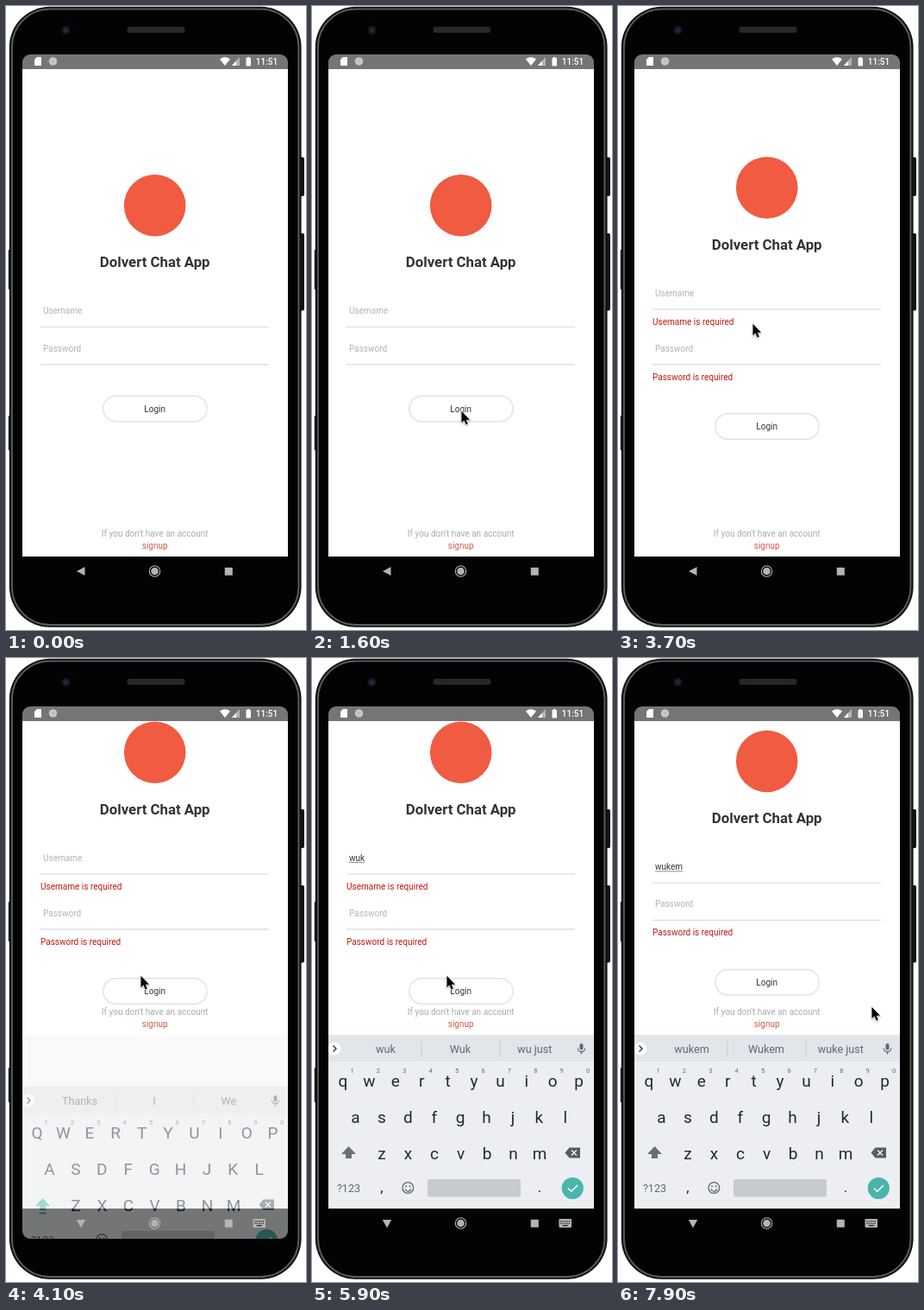
Recreate the animation shown at these times as an HTML page with a canvas. Size 348 by 722 pixels, loop 8 s.

```html
<!DOCTYPE html>
<html lang="en">
<head>
<meta charset="utf-8">
<title>Login form</title>
<style>
  html, body { margin: 0; width: 100%; height: 100%; overflow: hidden; background: #fff; }
  canvas { display: block; width: 348px; height: 722px; }
</style>
</head>
<body>
<canvas id="stage" width="348" height="722"></canvas>
<script>
const stage = document.getElementById('stage');
const screen = stage.getContext('2d');
const layer = Object.assign(document.createElement('canvas'), { width: 348, height: 722 });
const layerCtx = layer.getContext('2d');
let ctx = screen;

const LOOP = 8000, STEP = 100;
const FONT = 'Roboto, "Open Sans", sans-serif';
const APP = 'Dolvert Chat App', USER = 'wukem';
const TEAL = '#4ab5aa', KEY = '#1d2a35', MUTED = '#5f686f';
const T = { submit: 1800, keyboard: 4000, type: 5500, resubmit: 7300 };

// time, x, y of the pointer tip
const PATH = [
  [100, 324, 715], [700, 196, 502], [900, 196, 502], [1400, 173, 468], [1900, 173, 468],
  [2600, 198.5, 360], [3100, 198.5, 360], [3600, 156, 367], [6300, 156, 367],
  [6800, 179.5, 386], [7300, 179.5, 386], [7800, 294, 403]
];

const clamp = v => Math.max(0, Math.min(1, v));
const ease = p => p * p * (3 - 2 * p);

function box(x, y, w, h, r, fill, stroke, lw = 1) {
  ctx.beginPath();
  ctx.roundRect(x, y, w, h, r);
  paint(fill, stroke, lw);
}

function disc(x, y, r, fill, stroke, lw) {
  ctx.beginPath();
  ctx.arc(x, y, r, 0, 7);
  paint(fill, stroke, lw);
}

function poly(pts, fill, stroke, lw, open) {
  ctx.beginPath();
  for (let i = 0; i < pts.length; i += 2) ctx.lineTo(pts[i], pts[i + 1]);
  if (!open) ctx.closePath();
  paint(fill, stroke, lw);
}

function paint(fill, stroke, lw = 1) {
  if (fill) { ctx.fillStyle = fill; ctx.fill(); }
  if (stroke) { ctx.strokeStyle = stroke; ctx.lineWidth = lw; ctx.stroke(); }
}

function text(s, x, y, size, color, align = 'center', weight = 400) {
  ctx.font = `${weight} ${size}px ${FONT}`;
  ctx.textAlign = align;
  ctx.fillStyle = color;
  ctx.fillText(s, x, y);
}

function drawPhone() {
  box(338, 175, 8, 45, 2, '#111212');
  box(338, 263, 8, 89.5, 2, '#111212');
  box(2.8, 282, 4, 46, 1, '#222');
  box(2.8, 474, 4, 40, 1, '#222');
  box(3.8, 0.8, 338.8, 718, 47, '#111212');
  box(7, 3.6, 332.4, 712.4, 44, '#030303', '#5a5d5d', 1.8);
  disc(69.5, 28, 5, '#15171b');
  disc(69.5, 28, 2.6, '#1d2b45');
  box(140.5, 24, 67, 7, 3, '#272828');
}

function drawStatus() {
  box(19, 56, 308, 17, [9, 9, 0, 0], '#757575');
  poly([36, 59, 41, 59, 41, 69, 33, 69, 33, 62], '#fff');
  disc(54.5, 64, 4.8, '#bdbdbd');
  disc(54.5, 64, 3.2, null, '#d8d8d8', 1);
  ctx.beginPath();
  ctx.moveTo(254, 69);
  ctx.lineTo(248, 61.5);
  ctx.quadraticCurveTo(254, 57, 260, 61.5);
  ctx.closePath();
  paint('#fff');
  poly([271, 59, 271, 69, 262, 69], '#b5b5b5');
  poly([267, 63.5, 267, 69, 262, 69], '#fff');
  box(278.5, 60, 5.5, 9.5, 0.8, '#fff');
  box(280, 59, 2.5, 2, 0, '#fff');
  text('11:51', 302.5, 68, 10, '#fff', 'center', 500);
}

function field(y, label, value, caret) {
  text(value || label, 43, y + 3.6, 10, value ? '#333' : '#b3b3b3', 'left');
  const w = value ? ctx.measureText(value).width : 0;
  if (value) box(43, y + 5, w, 0.7, 0, '#666');
  if (caret) box(42.7 + w, y - 7, 1.4, 14, 0, '#34777c');
  box(40, y + 18, 265, 1.3, 0, '#e0e0e0');
}

function drawForm(t, value) {
  const up = t >= T.keyboard;
  const userError = t >= T.submit && t < T.resubmit;
  const passError = t >= T.submit;
  const gap = 20.5;
  const top = (up ? 129.7 : 230.7) - gap / 2 * (userError + passError);
  const caret = t >= 4300 && Math.floor(t / 500) % 2 === 0;

  disc(172.7, top, 35.8, '#f05b41');
  text(APP, 172.7, top + 71.6, 16.8, '#333', 'center', 700);

  let y = top + 122;
  const note = s => { text(s, 40, y + 36.6, 10, '#c1160f', 'left'); y += gap; };
  field(y, 'Username', value, caret);
  if (userError) note('Username is required');
  y += 43.4;
  field(y, 'Password');
  if (passError) note('Password is required');

  y += 70;
  box(112.7, y - 14.8, 120.5, 29.4, 14.7, '#fff', '#e2e2e2', 1.4);
  text('Login', 172.7, y + 3.8, 10, '#333');

  const foot = up ? 413 : 614;
  text("If you don't have an account", 172.7, foot, 10, '#aaa');
  text('signup', 172.7, foot + 13.5, 10, '#d35a49');
}

function drawRow(chars, x, step, y, upper) {
  [...chars].forEach((c, i) =>
    text(upper ? c.toUpperCase() : c, x + i * step, y, 19, KEY));
}

function drawStrip(value) {
  box(19, 436, 308, 32, 0, '#e2e5e9');
  disc(25.8, 452, 7.5, '#fff');
  poly([24.5, 448.5, 28, 452, 24.5, 455.5], null, '#333', 1.4, true);
  const words = value
    ? [value, value[0].toUpperCase() + value.slice(1), (value.slice(0, -1) || value) + ' just']
    : ['Thanks', 'I', 'We'];
  words.forEach((w, i) => text(w, 85.5 + i * 86.4, 456.5, 12.6, MUTED));
  for (const x of [126.5, 217.5]) box(x, 443, 1, 18, 0, '#c5cace');
  box(310.5, 446, 4, 7.5, 2, MUTED);
  ctx.beginPath();
  ctx.arc(312.5, 451.5, 4.2, 0, Math.PI);
  paint(null, MUTED, 1.2);
  box(311.9, 455.5, 1.2, 3, 0, MUTED);
}

function drawKeys(upper) {
  box(19, 467, 308, 170, 0, '#eceef2');
  drawRow('qwertyuiop', 36, 30.4, 496, upper);
  drawRow('asdfghjkl', 50.5, 30.4, 538, upper);
  drawRow('zxcvbnm', 81, 30.5, 580, upper);
  [...'1234567890'].forEach((d, i) => text(d, 46.5 + i * 30.4, 480, 7.5, MUTED));

  const shift = upper ? TEAL : '#66707a';
  poly([42.5, 565, 51, 574, 46, 574, 46, 579, 39, 579, 39, 574, 34, 574], shift);
  if (upper) box(38.5, 581.5, 8, 1.8, 0, shift);

  poly([293.5, 572.5, 298.5, 566.5, 311, 566.5, 311, 578.5, 298.5, 578.5], '#535d66');
  poly([301, 569.5, 307, 575.5], null, '#fff', 1.3, true);
  poly([307, 569.5, 301, 575.5], null, '#fff', 1.3, true);

  text('?123', 42.5, 618, 12.6, MUTED);
  text(',', 81, 618, 17, KEY);
  text('.', 264, 618, 17, KEY);
  disc(111.3, 613, 6.4, null, MUTED, 1.3);
  disc(109, 611.2, 1, MUTED);
  disc(113.6, 611.2, 1, MUTED);
  ctx.beginPath();
  ctx.arc(111.3, 613.5, 3.5, 0.2, Math.PI - 0.2);
  paint(null, MUTED, 1.2);
  box(134, 603, 108, 20.5, 2, '#c7cace');
  disc(302.3, 613.5, 12.6, TEAL);
  poly([297, 613.5, 300.8, 617.2, 308, 610], null, '#fff', 1.6, true);
}

// The keyboard is painted on its own layer so that it fades in as one piece.
function drawKeyboard(t, value) {
  const p = clamp((t - T.keyboard) / 300);
  box(19, 436, 308, 201, 0, '#f9f9f9');
  if (!p) return;
  ctx = layerCtx;
  ctx.clearRect(0, 0, 348, 722);
  drawStrip(value);
  drawKeys(!value);
  ctx = screen;
  ctx.save();
  ctx.beginPath();
  ctx.roundRect(19, 436, 308, 236, [0, 0, 9, 9]);
  ctx.clip();
  ctx.globalAlpha = 1 - (1 - p) ** 1.65;
  ctx.drawImage(layer, 0, Math.round(135 * (1 - p) ** 2));
  ctx.restore();
}

function drawNav(up) {
  const c = '#b4b4b4';
  poly(up ? [81.8, 650, 92.2, 650, 87, 659.5] : [91.5, 649, 91.5, 659, 82, 654], c);
  disc(172.5, 654, 6.2, null, c, 1.1);
  disc(172.5, 654, 4.3, c);
  box(253.8, 649.8, 9, 9, 0.5, c);
  if (!up) return;
  box(286.5, 649, 14.5, 10, 1, c);
  for (let i = 0; i < 10; i++)
    box(288.2 + i % 5 * 2.4, 651 + Math.floor(i / 5) * 2.4, 1.3, 1.3, 0, '#222');
  box(290.8, 656, 6, 1.3, 0, '#222');
}

function drawPointer(t) {
  if (t < PATH[0][0]) return;
  let i = PATH.findIndex(k => k[0] > t);
  if (i < 0) i = PATH.length - 1;
  const [t0, x0, y0] = PATH[i - 1], [t1, x1, y1] = PATH[i];
  const p = ease(clamp((t - t0) / (t1 - t0)));
  ctx.save();
  ctx.translate(x0 + (x1 - x0) * p, y0 + (y1 - y0) * p + 0.8);
  ctx.scale(0.87, 0.87);
  ctx.shadowColor = 'rgba(0,0,0,.25)';
  ctx.shadowBlur = 2;
  ctx.shadowOffsetY = 1;
  const arrow = [0.5, 0, 0.5, 15.5, 4, 12.3, 6.5, 18, 9, 17, 6.6, 11.3, 11.5, 11.3];
  poly(arrow, '#000', '#fff', 1.6);
  ctx.shadowColor = 'transparent';
  poly(arrow, '#000');
  ctx.restore();
}

function draw(t) {
  const up = t >= T.keyboard;
  const value = USER.slice(0, Math.max(0, Math.floor((t - T.type) / 200) + 1));
  ctx.fillStyle = '#fff';
  ctx.fillRect(0, 0, 348, 722);
  drawPhone();
  box(19, 72, 308, 565, 0, '#fff');
  drawForm(t, value);
  drawStatus();
  if (up) drawKeyboard(t, value);
  drawNav(up);
  drawPointer(t);
}

const start = performance.now();
function tick() {
  const t = (performance.now() - start) % LOOP;
  draw(Math.floor(t / STEP) * STEP);
  requestAnimationFrame(tick);
}
tick();
</script>
</body>
</html>
```
